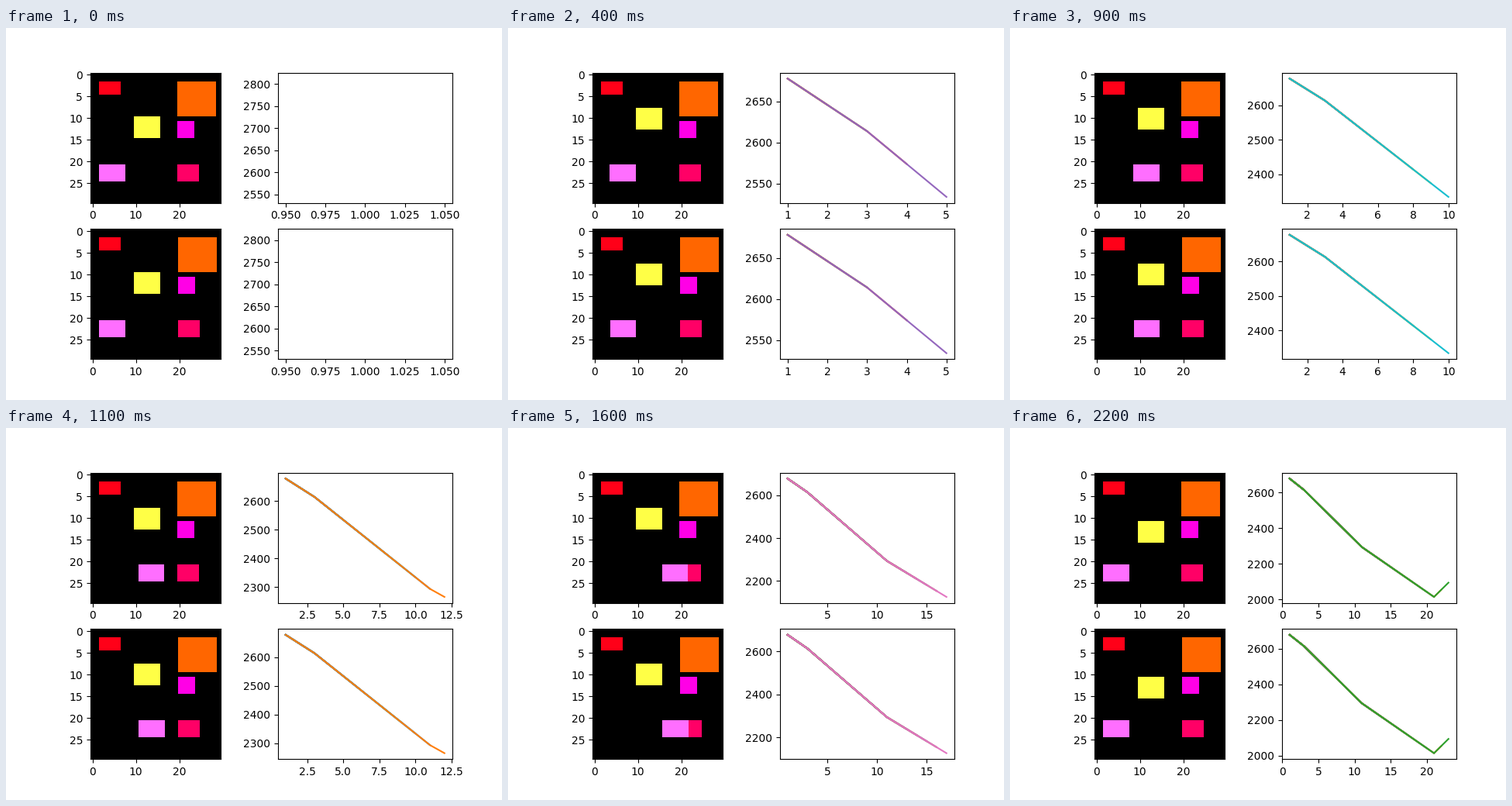
Write a matplotlib script that moves like this. It is 640x480 px and loops after 2.3 s.

```python
import numpy as np
import matplotlib.pyplot as plt
from matplotlib.animation import FuncAnimation
from matplotlib.colors import to_rgb

STEPS = 23
SIZE = 30
LIFT = 3  # moves of the yellow block before the pink one starts


def layout(moves):
    """Row of the yellow block and column of the pink one."""
    return 11 - np.minimum(moves, LIFT), 2 + np.maximum(moves - LIFT, 0)


def cost(moves):
    """Weighted distance of the moving blocks from the resting ones."""
    row, col = layout(moves)
    return 1698 + 32 * row + 6 * abs(col - 10) + 34 * abs(col - 20)


def board(moves):
    img = np.zeros((SIZE, SIZE, 3))

    def block(x, y, w, h, color):
        img[y:y + h, x:x + w] = to_rgb(color)

    row, col = layout(moves)
    block(2, 2, 5, 3, "#ff0018")
    block(20, 2, 9, 8, "#ff6600")
    block(20, 11, 4, 4, "#ff00e6")
    block(20, 21, 5, 4, "#ff0066")
    block(10, row, 6, 5, "#ffff46")
    block(col, 21, 6, 4, "#ff6eff")
    return img


steps = np.arange(1, STEPS + 1)
costs = cost(steps)

fig, axes = plt.subplots(2, 2, figsize=(6.4, 4.8), dpi=100)
images = [ax.imshow(board(1)) for ax in axes[:, 0]]


def update(n):
    for im in images:
        im.set_data(board((n + 1) % STEPS))  # the last move resets the board
    for ax in axes[:, 1]:
        ax.clear()
        # each step lays a longer line over the earlier ones
        for k in steps[:n + 1]:
            ax.plot(steps[:k], costs[:k])


anim = FuncAnimation(fig, update, frames=STEPS, init_func=lambda: update(0),
                     interval=100, repeat=True, repeat_delay=0)
plt.show()
```
